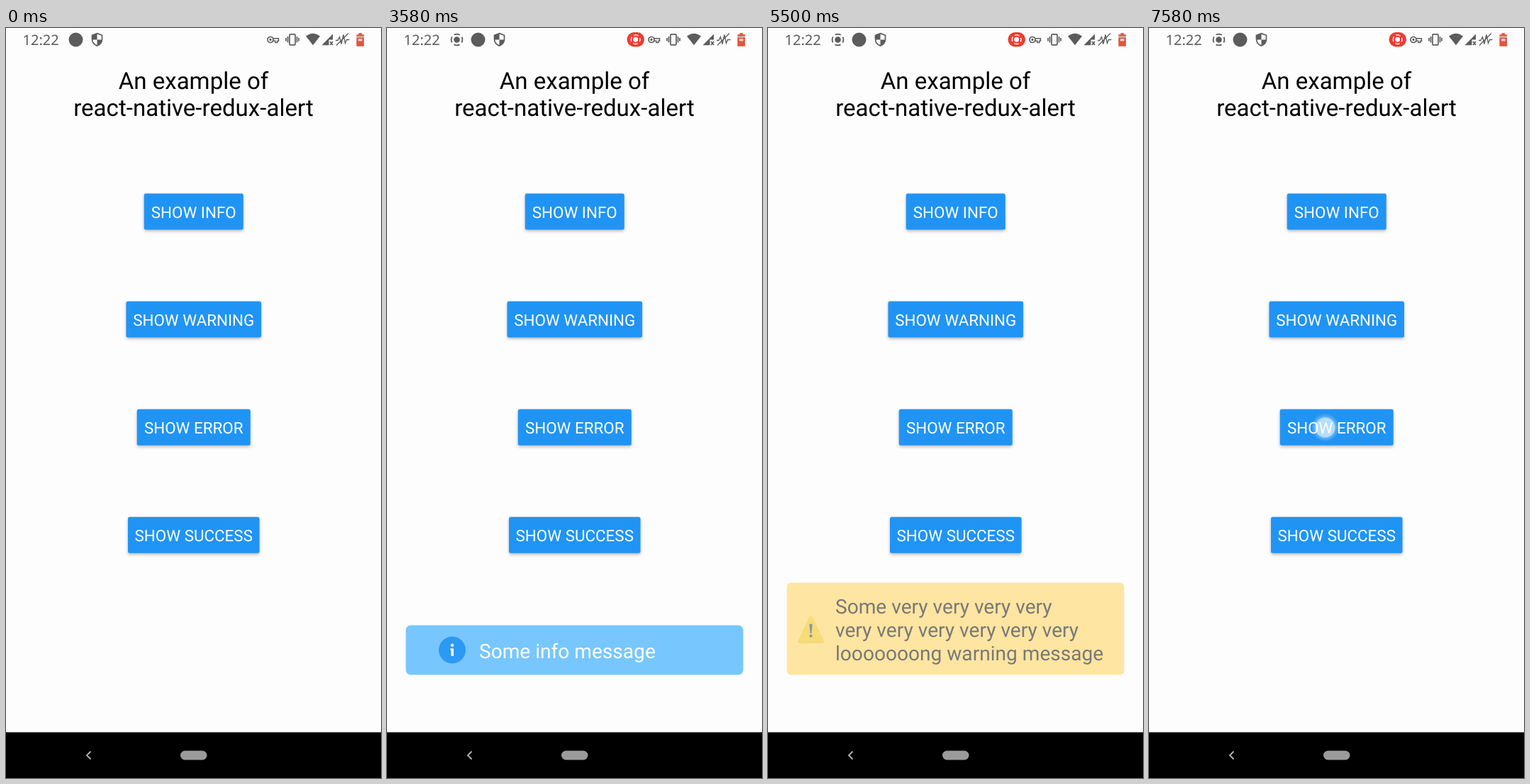
Recreate the animation shown at these times as an HTML page. Size 529x1058 px, loop 8000 ms.

```html
<!DOCTYPE html>
<html lang="en">
<head>
<meta charset="utf-8">
<title>Alert demo</title>
<style>
  html, body { margin: 0; width: 100%; height: 100%; overflow: hidden; background: #fefdfe; }
  svg { display: block; width: 529px; height: 1058px; }
  text { font-family: Roboto, sans-serif; text-rendering: geometricPrecision; }
  .title { font-size: 33.1px; text-anchor: middle; }
  .label { font-size: 22.4px; text-anchor: middle; fill: #fff; }
  .message { font-size: 28.1px; }
  .clock { font: 500 20px "Noto Sans", "Open Sans", sans-serif; fill: #5c5c5c; }
  .button { filter: drop-shadow(0 2px 2px rgba(0, 0, 0, .28)); }
  .line { fill: none; stroke: #5c5c5c; stroke-width: 1.7; }
</style>
</head>
<body>
<svg viewBox="0 0 529 1058">
  <defs>
    <g id="record" fill="none" stroke-width="1.8">
      <circle r="7.9" stroke-dasharray="8.4 4.01" stroke-dashoffset="4.2"/>
      <circle r="3.4" fill="currentColor"/>
    </g>
    <radialGradient id="glow">
      <stop offset=".66" stop-color="#fff" stop-opacity=".68"/>
      <stop offset=".74" stop-color="#fff" stop-opacity=".28"/>
      <stop offset="1" stop-color="#fff" stop-opacity="0"/>
    </radialGradient>
  </defs>
  <rect width="529" height="1058" fill="#fefdfe"/>

  <!-- status bar -->
  <text class="clock" x="23.5" y="24">12:22</text>
  <g id="recording">
    <use href="#record" x="98.5" y="16.5" stroke="#5c5c5c" color="#5c5c5c"/>
    <rect x="338.5" y="6" width="24.5" height="20.5" rx="10" fill="#ea3d31"/>
    <use href="#record" transform="translate(350.7 16.2) scale(.8)" stroke="#fff" color="#fff"/>
  </g>
  <g id="apps">
    <circle cx="98.5" cy="16.5" r="10" fill="#5c5c5c"/>
    <path d="M128.5 7.6l7 2.7v5.4q0 6.5-7 9.4q-7-2.900-7-9.400v-5.400z" class="line"/>
    <path d="M128.500 8v8.400h-7v-6zM128.500 16.400h7q-.7 6-7 8.600z" fill="#5c5c5c"/>
  </g>
  <g class="line">
    <circle cx="373" cy="16.500" r="4"/>
    <path d="M377 14.700h7.500v3.600h-1.600v2.200h-3v-2.200h-3" stroke-width="1.500"/>
    <circle cx="373" cy="16.500" r=".8"/>
    <rect x="400" y="8.800" width="8" height="15" rx="1"/>
    <path d="M397.500 12v8.500M395 14v4.500M410.500 12v8.500M413 14v4.500"/>
  </g>
  <g fill="#5c5c5c">
    <path d="M423 11.500q10-7.600 20 0l-10 12.800z"/>
    <path d="M461 8.500v8h-5.500v7.800h-10z"/>
    <path d="M457 19l4 5M461 19l-4 5" class="line" stroke-width="1.300"/>
    <path d="M465 17.500h3l2.500-5 2.500 10 3-13 2.500 12 2-5h4M466 24.500l17-17" class="line" style="stroke-width:1.300"/>
  </g>
  <path d="M494.500 9.200h3v-2h4.500v2h3v16.600h-10.500z" fill="#c9c4c3"/>
  <path d="M494.500 9.200h3v-2h4.500v2h3v2.300h-10.500zM494.500 13.500h10.500v12.300h-10.500z" fill="#e0563d"/>
  <path d="M497 15.200h5.500v3.200h-5.500z" fill="#f7d9d2"/>

  <text class="title" x="264.500" y="85.500">An example of</text>
  <text class="title" x="264.500" y="124">react-native-redux-alert</text>
  <g id="buttons"></g>
  <circle id="touch" r="20" fill="url(#glow)"/>

  <g id="info">
    <rect x="26.500" y="842.500" width="476" height="70" rx="7" fill="#70c4ff"/>
    <circle cx="92" cy="877.500" r="19" fill="#2094f5"/>
    <circle cx="92" cy="870.700" r="2.200" fill="#fff"/>
    <path d="M89.300 875.200h4.600v10.800h-3.500v-8.500h-1.100z" fill="#fff"/>
    <text class="message" x="130" y="888.500" fill="#fff">Some info message</text>
  </g>
  <g id="warning">
    <rect x="26.500" y="782.500" width="476" height="130" rx="6" fill="#ffd358"/>
    <path d="M60.500 832.500l15.500 32.500h-31z" fill="#dfaa10" stroke="#dfaa10" stroke-width="5" stroke-linejoin="round"/>
    <path d="M60.500 832l15.500 32h-31z" fill="#f1c40f" stroke="#f1c40f" stroke-width="4.600" stroke-linejoin="round"/>
    <path d="M58.300 841.500q2.200-2 4.400 0l-1.300 12.500h-1.800z" fill="#34495e"/>
    <circle cx="60.500" cy="857.600" r="2.100" fill="#34495e"/>
    <g class="message" fill="#111">
      <text x="95" y="826">Some very very very very</text>
      <text x="95" y="859">very very very very very very</text>
      <text x="95" y="892">looooooong warning message</text>
    </g>
  </g>

  <!-- navigation bar -->
  <rect y="993.500" width="529" height="65"/>
  <path d="M119.500 1020.500l-5.500 5.500 5.500 5.500" fill="none" stroke="#b5b5b5" stroke-width="1.800"/>
  <rect x="246" y="1019.500" width="37.500" height="13" rx="6.500" fill="#9b9b9b"/>
</svg>
<script>
const LOOP = 8000, STEP = 1000 / 12, FADE = 500;
const $ = id => document.getElementById(id);

const buttons = [
  ["SHOW INFO", 140], ["SHOW WARNING", 190.5], ["SHOW ERROR", 160], ["SHOW SUCCESS", 185.5]
];
$("buttons").innerHTML = buttons.map(([label, width], i) => {
  const y = 233.5 + i * 152.1;
  return `<rect class="button" x="${264.75 - width / 2}" y="${y}" width="${width}" height="51" rx="2.5"/>
    <text class="label" x="264.75" y="${y + 34.3}">${label}</text>`;
}).join("");
const faces = document.querySelectorAll(".button");

const taps = [
  { at: 1000, x: 236, y: 260, button: 0 },
  { at: 5166, x: 217, y: 413, button: 1 },
  { at: 7583, x: 248.5, y: 563.5, button: 2, held: true }
];
const alerts = [
  { id: "info", show: 1062, hide: 3501 },
  { id: "warning", show: 5235, hide: 7010 }
];

const clamp = v => Math.min(1, Math.max(0, v));
const ease = v => v < .5 ? 2 * v * v : 1 - 2 * (1 - v) ** 2;
const fade = (t, start) => ease(clamp((t - start) / FADE));

function press({ at, held }, t) {
  if (held || t < at - 1) return 0;
  return 1 - clamp((t - at - 40) / 200);
}

function draw(time) {
  const t = Math.floor((time + 5) / STEP) * STEP;
  const recording = t > STEP / 2;
  $("recording").style.display = recording ? "" : "none";
  $("apps").setAttribute("transform", `translate(${recording ? 30 : 0})`);

  faces.forEach((face, i) => {
    const tap = taps.find(p => p.button === i);
    const k = tap ? press(tap, t) : 0;
    face.setAttribute("fill", `rgb(${32 - k}, ${148 - 20 * k}, ${245 - 33 * k})`);
  });

  const tap = taps.find(p => t >= p.at - 1 && (p.held || t < p.at + 80));
  $("touch").style.display = tap ? "" : "none";
  if (tap) $("touch").setAttribute("transform", `translate(${tap.x} ${tap.y})`);

  for (const { id, show, hide } of alerts)
    $(id).setAttribute("opacity", fade(t, show) - fade(t, hide));
}

const start = performance.now();
function tick() {
  draw((performance.now() - start) % LOOP);
  requestAnimationFrame(tick);
}
tick();
</script>
</body>
</html>
```
